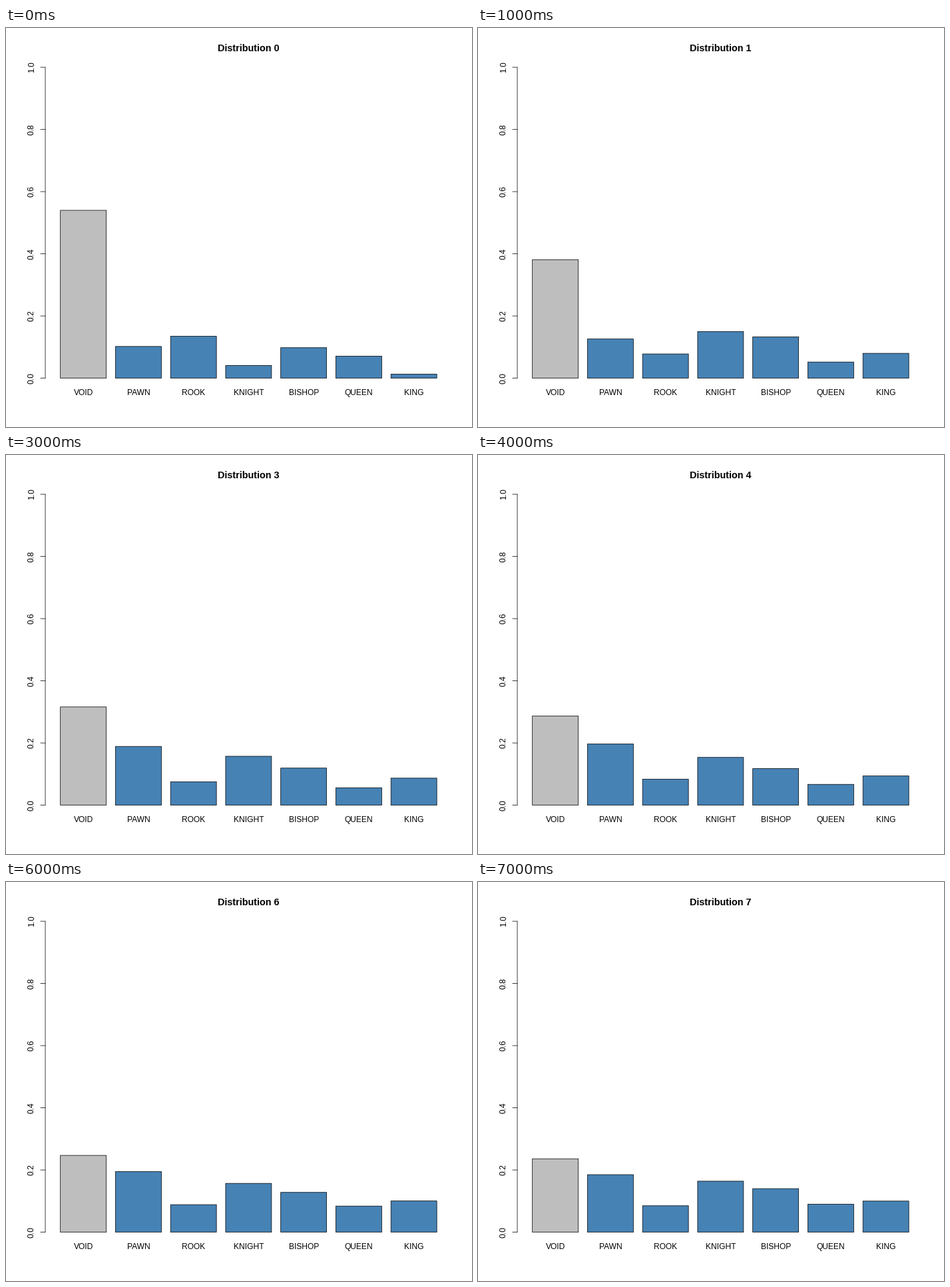
These frames come from a looping animation (700x600 px, 8 s). A matplotlib script:

```python
import matplotlib.pyplot as plt
import numpy as np
from matplotlib.animation import FuncAnimation
from matplotlib.patches import Rectangle

W, H = 700, 600
LEFT, RIGHT = 59.04, 669.76
TOP, BOTTOM = 59.04, 526.56
STEPS, STEP_MS = 8, 1000

# Shares in thousandths at the key steps; VOID takes what is left
KEY_STEPS = [0, 1, 2, 5, 7]
PATHS = {
    "PAWN": [102, 126, 181, 205, 185],
    "ROOK": [135, 78, 67, 92, 85],
    "KNIGHT": [41, 150, 161, 150, 164],
    "BISHOP": [98, 133, 121, 116, 140],
    "QUEEN": [71, 52, 45, 78, 90],
    "KING": [13, 80, 80, 101, 100],
}

plt.rcParams.update({
    "font.family": "Liberation Sans",
    "font.size": 12,
    "path.snap": False,
})

# At 72 dpi one point is one pixel
fig = plt.figure(figsize=(W / 72, H / 72), dpi=72, facecolor="white")
ax = fig.add_axes([0, 0, 1, 1])
ax.set(xlim=(0, W), ylim=(H, 0))
ax.axis("off")


def x_at(u):
    """Pixel column of a bar coordinate; the bars span 0.2 to 8.4."""
    return LEFT + (u + 0.128) / 8.856 * (RIGHT - LEFT)


def y_at(share):
    return BOTTOM - share * (BOTTOM - TOP)


def shares_at(step):
    pieces = [np.interp(step, KEY_STEPS, path) / 1000
              for path in PATHS.values()]
    return [1 - sum(pieces), *pieces]


def line(xs, ys):
    ax.plot(xs, ys, color="black", lw=0.75, solid_capstyle="round")


def label(x, y, text, **style):
    return ax.text(x, y, text, ha="center", va="baseline",
                   rotation_mode="anchor", **style)


line([LEFT, LEFT], [TOP, BOTTOM])
for i in range(6):
    y = y_at(i / 5)
    line([LEFT - 7.2, LEFT], [y, y])
    label(41.76, y, f"{i / 5:.1f}", rotation=90)

bars = []
for i, piece in enumerate(["VOID", *PATHS]):
    x0, x1 = x_at(0.2 + 1.2 * i), x_at(1.2 + 1.2 * i)
    bar = Rectangle((x0, BOTTOM), x1 - x0, 0, lw=0.75, ec="black",
                    fc="#4682b4" if i else "#bebebe", joinstyle="round")
    bars.append(ax.add_patch(bar))
    label((x0 + x1) / 2, 552, piece)

title = label((LEFT + RIGHT) / 2, 35, "", size=14.4, weight="bold")


def draw(step):
    title.set_text(f"Distribution {step}")
    for bar, share in zip(bars, shares_at(step)):
        bar.set_height(y_at(share) - BOTTOM)
    return [title, *bars]


anim = FuncAnimation(fig, draw, frames=STEPS, interval=STEP_MS,
                     repeat=True, repeat_delay=0)
plt.show()
```
